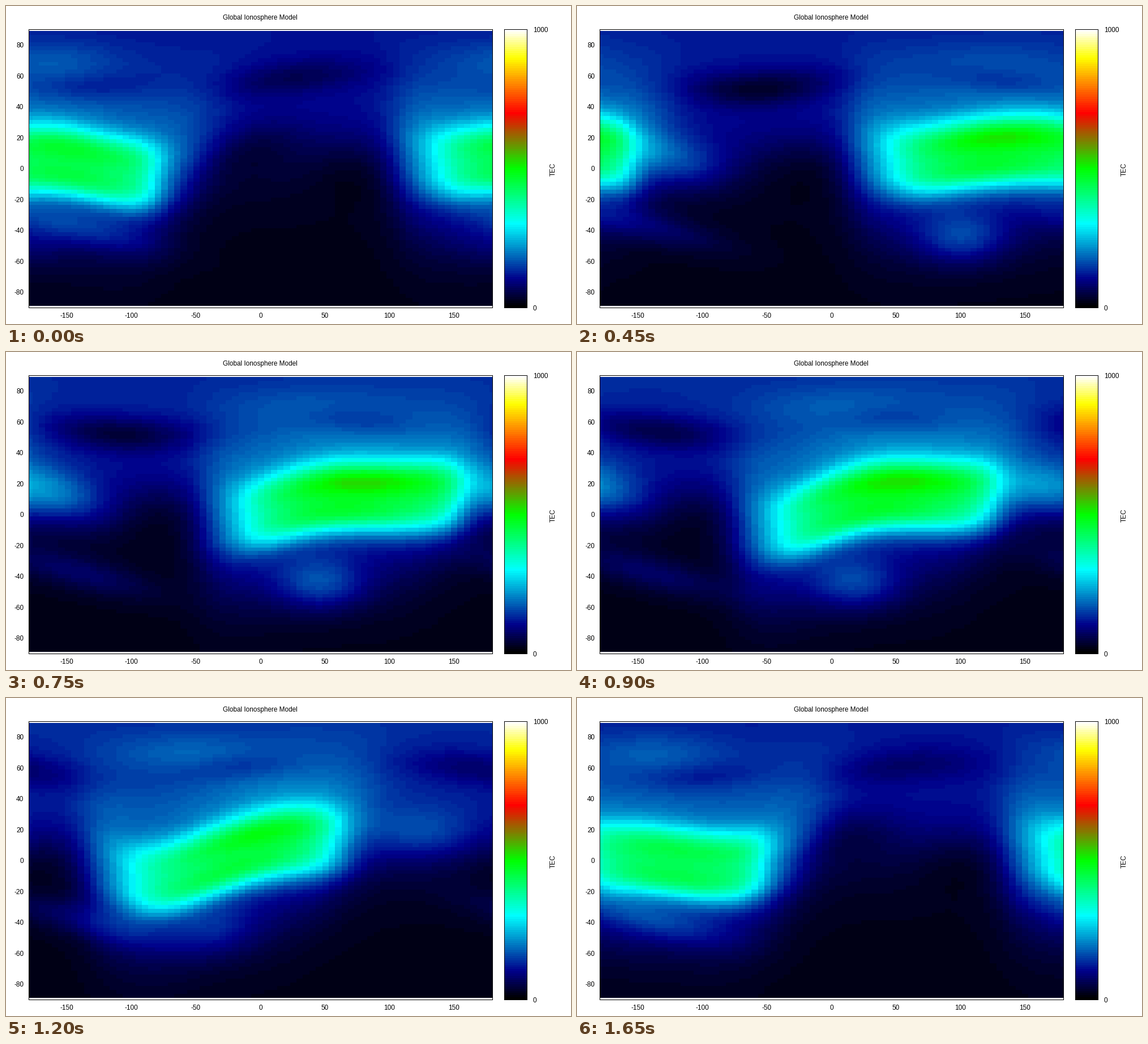
Write a matplotlib script that moves like this. It is 998 px wide and 561 px high and loops after 1800 ms.

```python
import numpy as np
import matplotlib.pyplot as plt
from matplotlib.animation import FuncAnimation
from matplotlib.colors import LinearSegmentedColormap

W, H, DPI = 998, 561, 100
FRAMES, INTERVAL = 12, 150
NOON = -135           # longitude of local noon at the start of the loop

LON, LAT = np.meshgrid(np.arange(-180, 181, 5), np.arange(87.5, -88, -2.5))


def cosd(a):
    return np.cos(np.radians(a))


def wrap(a):
    return (a + 180) % 360 - 180


def step(x, at, width):
    """Soft step from 0 to 1."""
    return 1 / (1 + np.exp(-(x - at) / width))


def bell(x, at, width):
    return np.exp(-0.5 * ((x - at) / width) ** 2)


def blob(x, x0, sx, y, y0, sy):
    return bell(wrap(x - x0), 0, sx) * bell(y, y0, sy)


def tec(i):
    """Electron content: a daytime bulge that follows the sun westward."""
    turn = i / FRAMES
    hour = wrap(LON - NOON + 360 * turn)      # degrees east of local noon

    # Wavy magnetic equator, pulled south on the morning side.
    equator = 6.5 + 8 * cosd(LON - 95) + 3 * cosd(2 * (LON - 10))
    equator -= 8 * bell(hour, -80, 35)
    d = LAT - equator

    # Summer north, dark winter south, brighter around noon.
    north = 105 + 10 * cosd(360 * turn - 210)
    field = 20 + north * step(LAT, 8, 14)
    day = step(hour, -118, 9) * (1 - step(hour, 80 + 0.4 * LAT, 13))
    field += 130 * day * bell(d, 0, 35)

    # Equatorial band with a crest on each side.
    dusk = 66 - 14 * cosd(LON + 60)
    band = step(hour, -88, 12) * (1 - step(hour, dusk, 8))
    field += 210 * band * np.exp(-np.abs(d / 24) ** 3.5)
    field += 75 * (1 + 0.4 * cosd(LON - 100)) * blob(hour, 0, 42, d, 10, 7)
    field += 75 * blob(hour, -15, 42, d, -11, 7)

    # Evening tail: bright over the Pacific, a hollow over the Atlantic.
    field += (40 + 80 * cosd(LON - 190)) * blob(hour, 118, 36, d, 6, 12)

    # Southern lobe ahead of noon and a band fixed to the ground.
    field += (60 + 45 * cosd(LON - 60)) * blob(hour, -30, 26, LAT, -45, 12)
    field += 52 * blob(LON, -140, 42, LAT + 0.2 * wrap(LON + 140), -38, 8)

    # Polar patch, noon gap below it, night trough and pre-dawn hollow.
    field += (28 + 14 * cosd(LON + 100)) * blob(hour, -40, 42, LAT, 70, 9)
    field -= 32 * blob(hour, 0, 32, LAT, 57 + 5 * cosd(LON - 30), 6)
    tilt = cosd(LON + 80)
    field -= (62 + 24 * tilt) * blob(hour, 172, 42, LAT, 57 - 6 * tilt, 8)
    field -= 26 * blob(hour, -152, 25, LAT, 0, 15)
    return np.clip(field, 8, 1000)


cmap = LinearSegmentedColormap.from_list("tec", [
    (0, "#000000"), (0.1, "#00008b"), (0.3, "#00ffff"), (0.5, "#00ff00"),
    (0.7, "#ff0000"), (0.9, "#ffff00"), (1, "#ffffff")], N=128)

fig = plt.figure(figsize=(W / DPI, H / DPI), dpi=DPI, facecolor="white")


def pixel_axes(x0, y0, x1, y1):
    ax = fig.add_axes([x0 / W, 1 - y1 / H, (x1 - x0) / W, (y1 - y0) / H])
    ax.set_xticks([])
    ax.set_yticks([])
    for s in ax.spines.values():
        s.set_linewidth(0.72)
        s.set_snap(False)
    return ax


def label(x, y, s, ha="center", va="baseline", **kw):
    fig.text(x / W, 1 - y / H, s, ha=ha, va=va, family="Liberation Sans",
             size=11.75 * 72 / DPI, color="black", **kw)


ax = pixel_axes(40.5, 41.5, 859.5, 532.5)
img = ax.imshow(tec(0), cmap=cmap, vmin=0, vmax=1000, aspect="auto",
                interpolation="nearest", extent=(-182.5, 182.5, -88.75, 88.75))
ax.set_xlim(-180, 180)
ax.set_ylim(-90, 90)

bar = pixel_axes(880.5, 41.5, 920.5, 532.5)
bar.imshow(np.arange(128)[::-1, None], cmap=cmap, aspect="auto", interpolation="nearest")
bar.set_xticks([])
bar.set_yticks([])

label(448.5, 24.3, "Global Ionosphere Model")
for v in range(-150, 151, 50):
    label(449.7 + v * 2.275 - (v < 0), 550.3, str(v))
for v in range(-80, 81, 20):
    label(31.2, 291.2 - v * 2.728, str(v), ha="right")
label(930.8, 45.8, "1000", ha="left")
label(930.8, 536.6, "0", ha="left")
label(967, 288, "TEC", va="center", rotation=90)


def draw(i):
    img.set_data(tec(i))
    return [img]


anim = FuncAnimation(fig, draw, frames=FRAMES, interval=INTERVAL, repeat=True, repeat_delay=0)
plt.show()
```
